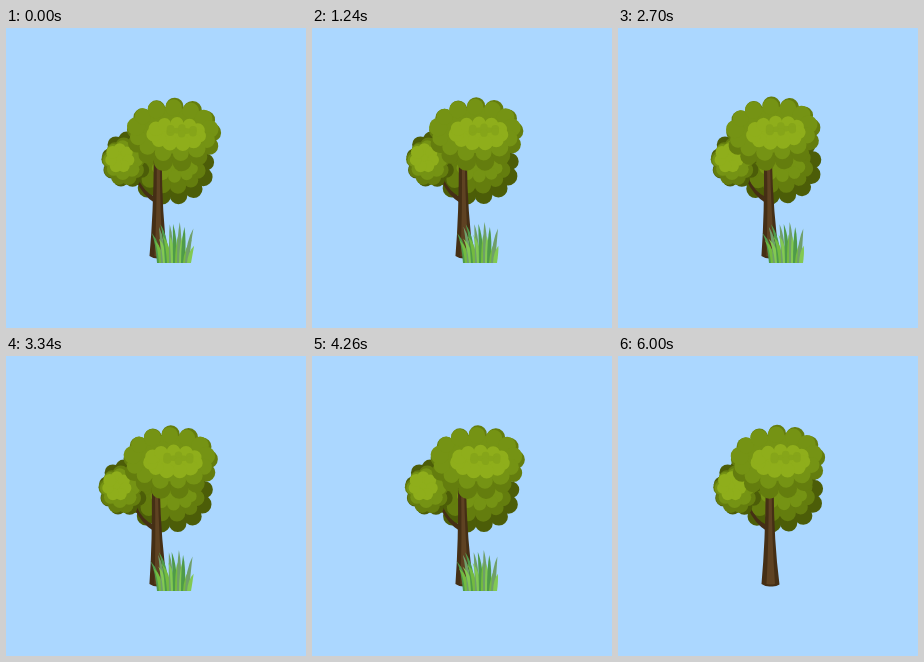
Write an HTML page that moves like this. It is 300 px wide and 300 px high and loops after 6020 ms.

```html
<!DOCTYPE html>
<html lang="en">
<head>
<meta charset="utf-8">
<title>Tree in the wind</title>
<style>
  html, body { margin: 0; width: 100%; height: 100%; overflow: hidden; background: #abd7ff; }
  svg { display: block; width: 100vw; height: 100vh; }
</style>
</head>
<body>
<svg viewBox="0 0 300 300">
  <g id="back"></g>
  <g id="trunk">
    <path fill="#452f15" d="M148 132 Q147.500 185 143.500 228 Q148 231 153 230.500 Q158 231 161.500 228.500 Q156 185 156 132Z"/>
    <path fill="#5e4222" d="M151 132 Q151 185 148.500 228 Q153 229 157 228 Q154 185 154 132Z"/>
    <path fill="#452f15" d="M132 150 Q138 164 149 169 V175 Q137 168 130 152Z"/>
  </g>
  <g id="side"></g>
  <g id="front"></g>
  <g id="grass"></g>
</svg>
<script>
const NS = 'http://www.w3.org/2000/svg';
const LOOP = 6020, GUST = 3100, GROUND = 235;
const $ = id => document.getElementById(id);

let seed = 7;
function random(min, max) {
  seed = seed * 16807 % 2147483647;
  return min + (max - min) * seed / 2147483647;
}

function add(parent, tag, attrs) {
  const el = document.createElementNS(NS, tag);
  for (const key in attrs) el.setAttribute(key, attrs[key]);
  parent.appendChild(el);
  return el;
}

// A leafy mass: an ellipse edged with evenly spread round bumps, one on top.
function leaves(id, fill, cx, cy, rx, ry, r, count) {
  const g = add($(id), 'g', { fill });
  add(g, 'ellipse', { cx, cy, rx, ry });
  for (let i = 0; i < count; i++) {
    const a = 2 * Math.PI * i / count;
    add(g, 'circle', { cx: cx + rx * Math.sin(a), cy: cy - ry * Math.cos(a), r: r * random(0.92, 1.08) });
  }
}

const deep = '#4c5d08', shade = '#647d0e', leaf = '#759314', light = '#8fae1b';

leaves('back', deep, 163, 137, 35, 31, 9, 13);
leaves('back', shade, 163, 139, 27, 19, 8, 11);
leaves('back', leaf, 167, 140, 17, 8, 6, 8);

leaves('side', deep, 121, 132, 17, 20, 8, 9);
leaves('side', shade, 118, 134, 14, 16, 8, 9);
leaves('side', leaf, 117, 132, 13, 13, 7, 8);
leaves('side', light, 114, 130, 9, 9, 6, 7);

leaves('front', shade, 163, 106, 38.500, 28, 9, 13);
leaves('front', leaf, 162, 102, 37, 23, 8.500, 13);
leaves('front', light, 166, 105, 23, 10, 7, 11);
leaves('front', '#86a519', 171, 102, 13, 3, 4, 6);

// Blades fan out from a narrow base, the outer ones lower and more bent.
const greens = ['#4f9a4a', '#74bb3f', '#6f9f6a', '#82c952'];
const COUNT = 16;
const blades = Array.from({ length: COUNT }, (_, i) => {
  const u = i / (COUNT - 1);
  const out = 2 * u - 1;
  return {
    x: 153 + 30 * u,
    tip: 165.500 + 23 * out + random(-3, 3),
    y: 198 + 11 * out * out + (i % 2 ? 7 : -4) + random(-2, 2),
    lag: 45 * (i % 4),
    el: add($('grass'), 'path', { fill: greens[i % greens.length] })
  };
});

// Crown lean: [ms, x of the top bump], eased between points.
const lean = [[0, 167], [600, 155], [1060, 165], [1700, 150], [2760, 151], [GUST, 167]];

function track(points, t) {
  const i = points.findIndex(p => p[0] > t);
  const [t0, a] = points[i - 1], [t1, b] = points[i];
  return a + (b - a) * (1 - Math.cos(Math.PI * (t - t0) / (t1 - t0))) / 2;
}

const swing = t => Math.cos(2 * Math.PI * (t + 85) / (GUST / 2));

function draw(t) {
  const angle = (track(lean, t % GUST) - 161) / 162 * 180 / Math.PI;
  const side = 4.250 * (swing(t) - 1);
  const bend = side * 0.650 / 94;

  $('front').setAttribute('transform', `rotate(${angle} 150 231)`);
  $('back').setAttribute('transform', `rotate(${angle * 0.500} 150 231)`);
  $('side').setAttribute('transform', `translate(${side} 0)`);
  $('trunk').setAttribute('transform', `matrix(1 0 ${-bend} 1 ${231 * bend} 0)`);

  for (const { x, tip, y, lag, el } of blades) {
    const end = tip + 2 * swing(t - lag);
    const mid = x + (end - x) * 0.200, bow = (GROUND + 2 * y) / 3;
    el.setAttribute('d', `M${x - 2} ${GROUND} Q${mid - 2} ${bow} ${end} ${y} Q${mid + 3} ${bow} ${x + 2} ${GROUND}Z`);
  }
  // The grass drops out just before the loop restarts.
  $('grass').setAttribute('visibility', t < LOOP - 30 ? 'visible' : 'hidden');
}

const start = performance.now();
function frame() {
  draw((performance.now() - start) % LOOP);
  requestAnimationFrame(frame);
}
frame();
</script>
</body>
</html>
```
